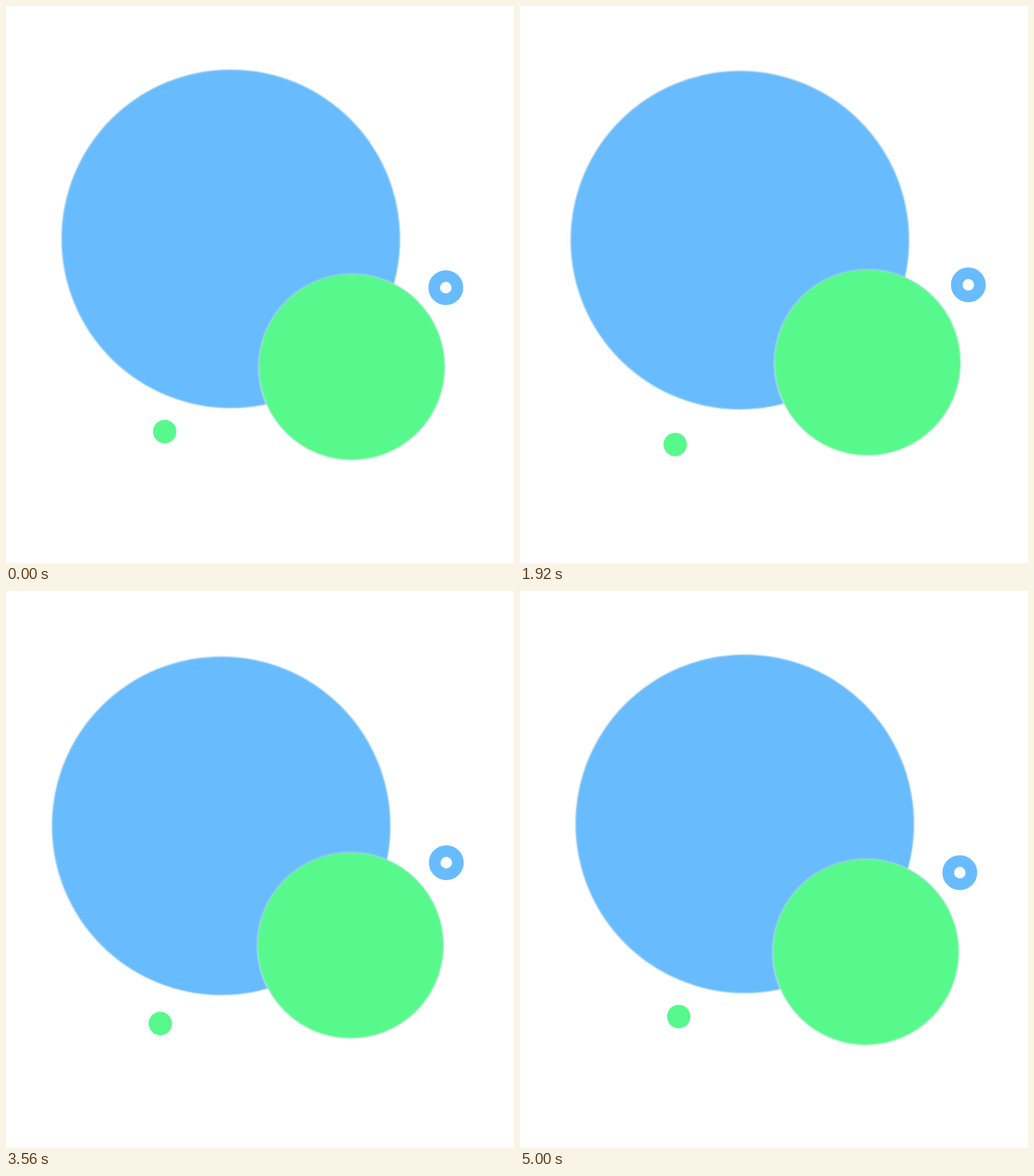
Recreate the animation shown at these times as an HTML page. Size 715 px wide and 784 px high, loop 5.04 s.

```html
<!DOCTYPE html>
<html lang="en">
<head>
<meta charset="utf-8">
<title>Floating circles</title>
<style>
  html, body { margin: 0; width: 100%; height: 100%; overflow: hidden; background: #fff; }
  svg { display: block; width: 100%; height: 100%; }
  .blue { fill: #68bcfe; }
  .green { fill: #58f98c; }
  .rim { stroke: url(#sheen); stroke-width: 3; }
  .ring { fill: #fff; stroke: #68bcfe; stroke-width: 16.4; }
</style>
</head>
<body>
<svg viewBox="0 0 715 784">
  <defs>
    <linearGradient id="sheen" x1=".3" y1="0" x2=".7" y2="1">
      <stop offset="0" stop-color="#a5cfe6" stop-opacity=".4"/>
      <stop offset="1" stop-color="#fff" stop-opacity=".42"/>
    </linearGradient>
  </defs>
  <circle id="disc" class="blue rim" r="238.4"/>
  <circle id="ball" class="green rim" r="131.2"/>
  <circle id="ring" class="ring" r="16.3"/>
  <circle id="dot" class="green" r="16.5"/>
</svg>
<script>
const LOOP = 5040, STEP = 40, LAST = (LOOP - STEP) / 1000;

// Turning points of each drift: seconds, x, y
const drifts = {
  disc: [[0, 316.5, 328.1], [1.25, 312.5, 333.1], [2.5, 307, 327.5], [3.5, 302.9, 330.8]],
  ball: [[0, 486.8, 508.2], [.9, 495.4, 499.8], [1.92, 489.2, 501.9], [3.04, 486.2, 495.1], [4.55, 484.7, 509]],
  ring: [[0, 619, 396.4], [.6, 621, 399.8], [1.55, 632.3, 394.2], [3.04, 618.2, 387.6], [4.15, 622, 380.2]],
  dot: [[0, 223.4, 599], [1.25, 207.8, 615.8], [2.2, 222, 617], [3.04, 219.8, 615.2], [4, 216.1, 603.1]]
};

// Slope through point i along one axis, weighted by segment length
function slope(p, i, axis) {
  const rate = k => (p[k + 1][axis] - p[k][axis]) / (p[k + 1][0] - p[k][0]);
  if (i === 0) return rate(0);
  if (i === p.length - 1) return rate(i - 1);
  const before = p[i][0] - p[i - 1][0], after = p[i + 1][0] - p[i][0];
  return (rate(i - 1) * after + rate(i) * before) / (before + after);
}

// Smooth curve through the points
function at(p, t, axis) {
  let i = 0;
  while (i < p.length - 2 && t >= p[i + 1][0]) i++;
  const h = p[i + 1][0] - p[i][0], u = (t - p[i][0]) / h, v = 1 - u;
  return v * v * (1 + 2 * u) * p[i][axis] + u * u * (3 - 2 * u) * p[i + 1][axis]
    + h * u * v * (v * slope(p, i, axis) - u * slope(p, i + 1, axis));
}

// Every drift returns to where it began
const shapes = Object.entries(drifts).map(([id, p]) =>
  [document.getElementById(id), [...p, [LAST, p[0][1], p[0][2]]]]);

function draw(ms) {
  const t = Math.floor(ms % LOOP / STEP) * STEP / 1000;
  for (const [el, p] of shapes) {
    el.setAttribute("cx", at(p, t, 1).toFixed(2));
    el.setAttribute("cy", at(p, t, 2).toFixed(2));
  }
}

const start = performance.now();
function tick() {
  draw(performance.now() - start);
  requestAnimationFrame(tick);
}
draw(0);
requestAnimationFrame(tick);
</script>
</body>
</html>
```
